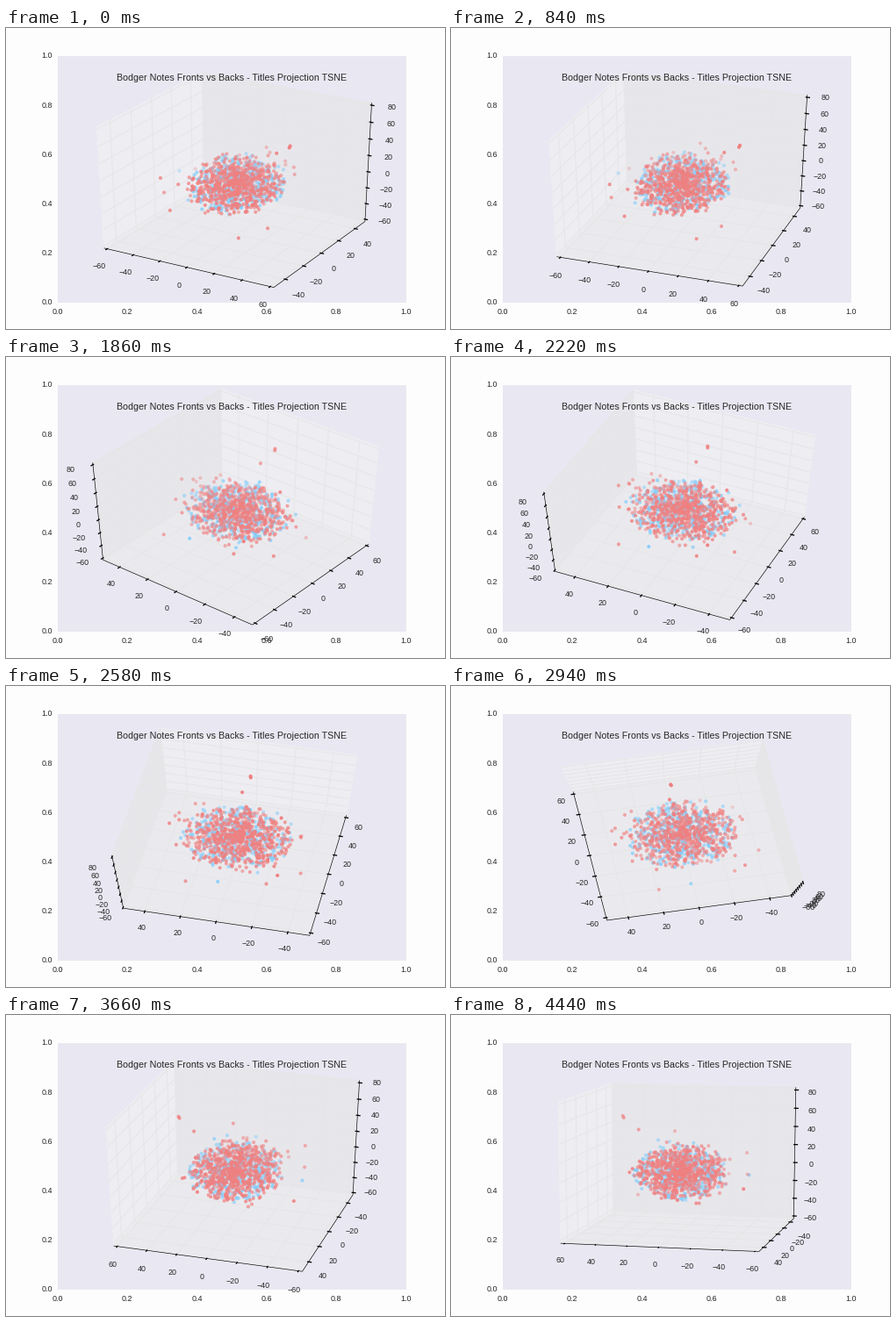
These frames come from a looping animation (500x343 px, 4.5 s). A matplotlib script:

```python
import numpy as np
import matplotlib.pyplot as plt
from matplotlib.animation import FuncAnimation
from matplotlib.collections import LineCollection
from matplotlib.patches import Polygon, Rectangle

W, H, DPI = 500, 343, 100
PX = 72 / DPI  # points per pixel
FRAMES, INTERVAL = 75, 60
LEFT, RIGHT, TOP, BOTTOM = 59, 455.5, 32, 312.5
INK = "#262626"
plt.rcParams["font.family"] = "Liberation Sans"

# camera keys: frame, azimuth, elevation
KEYS = np.array([(0, -60, 30), (23, -81, 38), (31, -141.5, 45.5),
                 (43, -167.6, 66), (49, -190.8, 82),
                 (61, -252.5, 33), (74, -257, 11)], float)

# perspective: the box is a unit cube centred on the origin
DIST = 10
SX, SY = (RIGHT - LEFT) / 0.185, (BOTTOM - TOP) / 0.185
CX, CY = LEFT + SX * 0.095, BOTTOM - SY * 0.095 + 0.3
EDGE = 0.5 + 1 / 48
LABEL_PAD = 0.079
TICKS = [np.arange(-60, 61, 20), np.arange(-40, 41, 20), np.arange(-60, 81, 20)]
LOW, SPAN = (-60, -50, -60), (120, 100, 140)
PANES = [0.95, 0.90, 0.925]
CROSS = (1, 0, 0)  # per axis: the direction of its ticks, and where it is on the near side


def smooth(t, ts, vs):
    """Monotone cubic through the keys."""
    h = np.diff(ts)
    d = np.diff(vs) / h
    m = np.r_[d[0], np.zeros(len(d) - 1), d[-1]]
    for i in range(1, len(d)):
        if d[i - 1] * d[i] > 0:
            m[i] = 2 * d[i - 1] * d[i] / (d[i - 1] + d[i])
    k = min(np.searchsorted(ts, t, side="right") - 1, len(d) - 1)
    s = (t - ts[k]) / h[k]
    return ((1 + 2 * s) * (1 - s) ** 2 * vs[k] + s * (1 - s) ** 2 * h[k] * m[k]
            + s * s * (3 - 2 * s) * vs[k + 1] + s * s * (s - 1) * h[k] * m[k + 1])


class Camera:
    def __init__(self, azim, elev):
        a, e = np.radians((azim, elev))
        self.normal = np.array([np.cos(a) * np.cos(e), np.sin(a) * np.cos(e), np.sin(e)])
        self.right = np.array([-np.sin(a), np.cos(a), 0])
        self.up = np.array([-np.cos(a) * np.sin(e), -np.sin(a) * np.sin(e), np.cos(e)])
        self.far = np.where(self.normal < 0, EDGE, -EDGE)

    def depth(self, p):
        return DIST - np.asarray(p) @ self.normal

    def project(self, p):
        p = np.asarray(p)
        d = self.depth(p)
        return np.stack([CX + SX * (p @ self.right) / d,
                         CY - SY * (p @ self.up) / d], axis=-1)


def ball(rng, count, fringe):
    """Round cloud of points with a few strays around it."""
    way = rng.normal(size=(count + fringe, 3))
    way /= np.linalg.norm(way, axis=1)[:, None]
    r = rng.random(count) ** 0.48 * (1 + 0.05 * rng.normal(size=count))
    r = np.r_[r, rng.uniform(1.0, 1.25, fringe)]
    return way * r[:, None] * (0.25, 0.3, 0.21) + (0, 0, -0.066)


rng = np.random.default_rng(12)
blue_far = [(-0.37, 0.02, -0.07)]
red_far = [(0.321, -0.004, 0.347), (0.317, -0.006, 0.333), (0.229, 0.02, 0.25),
           (0.088, -0.22, 0.205), (-0.298, -0.284, 0.04), (-0.375, 0.195, -0.14),
           (-0.178, -0.389, -0.15), (0.198, -0.323, -0.31), (0.28, -0.157, -0.29),
           (-0.313, -0.23, -0.118), (0.1, 0.36, -0.05), (-0.02, 0.36, 0.07),
           (0.2, 0.27, 0.0)]
clouds = [("#87CEFA", np.vstack([ball(rng, 430, 8), blue_far])),
          ("#F08080", np.vstack([ball(rng, 640, 26), red_far]))]

fig = plt.figure(figsize=(W / DPI, H / DPI), dpi=DPI, facecolor="#FDFDFD")
ax = fig.add_axes([0, 0, 1, 1])
ax.set(xlim=(0, W), ylim=(H, 0))
ax.axis("off")


def label(x, y, text, size=8.9, **kw):
    return ax.text(x, y, text, fontsize=size * PX, color=INK, **kw)


ax.add_patch(Rectangle((LEFT, TOP), RIGHT - LEFT, BOTTOM - TOP, fc="#E9E8F2", lw=0))
for v in np.linspace(0, 1, 6):
    label(LEFT + v * (RIGHT - LEFT), 323, f"{v:.1f}", ha="center", va="center")
    label(53, BOTTOM - v * (BOTTOM - TOP), f"{v:.1f}", ha="right", va="center")
label(257.3, 56.5, "Bodger Notes Fronts vs Backs - Titles Projection TSNE",
      10.6, ha="center", va="center", zorder=8)

panes = [ax.add_patch(Polygon(np.zeros((4, 2)), fc=(g, g, g, 0.5), ec=(g, g, g, 0.5),
                              lw=0.8 * PX, zorder=2)) for g in PANES]
grid = ax.add_collection(LineCollection([], colors="0.9", linewidths=0.9 * PX, zorder=3))
edges = ax.add_collection(LineCollection([], colors="black", linewidths=0.65 * PX, zorder=4))
marks = ax.add_collection(LineCollection([], colors="black", linewidths=1.3 * PX, zorder=4))
names = [[label(0, 0, str(v).replace("-", "\u2212"), ha="center", va="top", zorder=5)
          for v in vs] for vs in TICKS]
dots = [ax.scatter(p[:, 0], p[:, 1], s=(4.1 * PX) ** 2, c=color, linewidths=0, zorder=6 + i)
        for i, (color, p) in enumerate(clouds)]


def moved(p, axis, value):
    q = np.array(p, float)
    q[axis] = value
    return q


def draw_panes(cam):
    for i, pane in enumerate(panes):
        j, k = (i + 1) % 3, (i + 2) % 3
        corners = [moved(moved(cam.far, j, a * EDGE), k, b * EDGE)
                   for a, b in ((-1, -1), (1, -1), (1, 1), (-1, 1))]
        pane.set_xy(cam.project(corners))


def draw_axes(cam):
    grid_lines, edge_lines, tick_lines = [], [], []
    for i, c in enumerate(CROSS):
        j, k = (i + 1) % 3, (i + 2) % 3
        base = moved(cam.far, c, -cam.far[c])
        edge_lines.append(cam.project([moved(base, i, -EDGE), moved(base, i, EDGE)]))
        step = np.sign(cam.far[c]) / 120
        outward = moved(np.sign(base) * LABEL_PAD, i, 0)
        for value, name in zip(TICKS[i], names[i]):
            loc = (value - LOW[i]) / SPAN[i] - 0.5
            corner = moved(cam.far, i, loc)
            grid_lines.append(cam.project([moved(corner, j, -corner[j]), corner,
                                           moved(corner, k, -corner[k])]))
            pos = moved(base, i, loc)
            tick_lines.append(cam.project([moved(pos, c, pos[c] + step),
                                           moved(pos, c, pos[c] - 2 * step)]))
            name.set_position(cam.project(pos + outward))
    grid.set_segments(grid_lines)
    edges.set_segments(edge_lines)
    marks.set_segments(tick_lines)


def draw_dots(cam):
    for dot, (_, points) in zip(dots, clouds):
        d = cam.depth(points)
        dot.set_offsets(cam.project(points))
        dot.set_alpha(1 - 0.7 * (d - d.min()) / np.ptp(d))


def update(frame):
    cam = Camera(smooth(frame, KEYS[:, 0], KEYS[:, 1]),
                 smooth(frame, KEYS[:, 0], KEYS[:, 2]))
    draw_panes(cam)
    draw_axes(cam)
    draw_dots(cam)
    return []


anim = FuncAnimation(fig, update, frames=FRAMES, interval=INTERVAL,
                     repeat=True, repeat_delay=0, blit=False)
plt.show()
```
